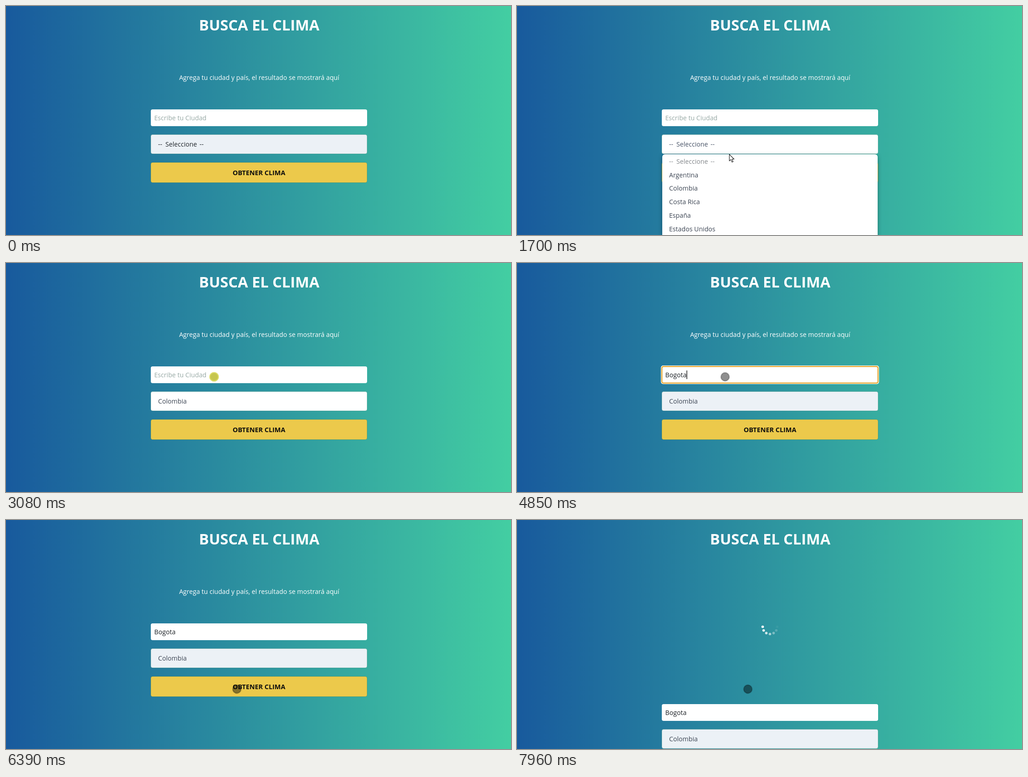
An HTML page for the animation above (8 s loop, 1109 by 505 pixels).

```html
<!DOCTYPE html>
<html lang="es">
<head>
<meta charset="utf-8">
<title>Busca el clima</title>
<style>
  html, body { margin: 0; width: 100%; height: 100%; overflow: hidden; }
  body { background: linear-gradient(to right, #185a9d, #43cea2); }
  svg { display: block; width: 1109px; height: 505px; }
  text { font: 14.15px "Open Sans", "Noto Sans", sans-serif; fill: #3d4654; }
  .title { font-size: 32.6px; font-weight: 700; fill: #fff; text-anchor: middle; }
  .hint { fill: #fff; text-anchor: middle; }
  .button { font-size: 14.4px; font-weight: 700; fill: #0c0c0c; text-anchor: middle; }
  .edge { stroke: #14705a; stroke-opacity: .35; }
  #panel { filter: drop-shadow(0 3px 5px rgba(0, 0, 0, .32)); }
</style>
</head>
<body>
<svg viewBox="0 0 1109 505">
  <text class="title" x="556" y="54">BUSCA EL CLIMA</text>
  <text class="hint" id="hint" x="556" y="163">Agrega tu ciudad y país, el resultado se mostrará aquí</text>
  <g id="spinner" fill="#fff"></g>

  <g id="form">
    <rect class="edge" x="318" y="345" width="475" height="44.5" rx="4" fill="#ecc94b"/>
    <text class="button" x="555.5" y="372.5">OBTENER CLIMA</text>

    <g id="ring">
      <rect x="316" y="226" width="479" height="41" rx="5" fill="#fff"/>
      <rect x="318.2" y="228.2" width="474.6" height="36.6" rx="3.5" fill="none" stroke="#e2970c" stroke-width="2"/>
    </g>
    <rect id="field" x="318" y="228" width="475" height="37" rx="4" fill="#fff"/>
    <text id="placeholder" x="325.5" y="252" style="fill:#98aaa6">Escribe tu Ciudad</text>
    <text id="city" x="325.5" y="252" style="fill:#1c2126"></text>
    <rect id="caret" y="237" width="1.3" height="19" fill="#000"/>

    <rect class="edge" id="select" x="318" y="283.5" width="475" height="42.5" rx="4"/>
    <text id="empty" y="310"><tspan x="334">--</tspan><tspan x="350">Seleccione</tspan><tspan x="425">--</tspan></text>
    <text id="country" x="334" y="310">Colombia</text>
  </g>

  <g id="panel">
    <rect x="319" y="327" width="473" height="300" rx="6" fill="#fff"/>
    <rect id="hover" x="319" y="386.6" width="473" height="29.6" fill="#ade1f7"/>
    <text y="348" style="fill:#85898d"><tspan x="334">--</tspan><tspan x="350">Seleccione</tspan><tspan x="425">--</tspan></text>
  </g>

  <circle id="dot"/>
  <path id="arrow" d="M0 0V14.5L3.4 11.5L5.8 17.2L8.3 16.1L5.9 10.6H10.4Z" stroke="#111" stroke-width="1.1" stroke-linejoin="round"/>
</svg>
<script>
const LOOP = 8000;
const $ = id => document.getElementById(id);
const svg = (tag, attrs, parent) => {
  const el = document.createElementNS("http://www.w3.org/2000/svg", tag);
  set(el, attrs);
  return parent.appendChild(el);
};
function set(el, attrs) {
  for (const key in attrs) el.setAttribute(key, attrs[key]);
}
const show = (id, on) => { $(id).style.display = on ? "" : "none"; };
const within = (t, from, to) => t >= from && t < to;
const smooth = p => p * p * (3 - 2 * p);

// Dropdown rows
const options = ["Argentina", "Colombia", "Costa Rica", "España", "Estados Unidos"]
  .map((name, i) => {
    const row = svg("text", { x: 334, y: 377.7 + i * 29.7 }, $("panel"));
    row.textContent = name;
    return row;
  });

// Ring of fading dots
const dots = Array.from({ length: 12 }, (_, i) => {
  const a = i * Math.PI / 6;
  return svg("circle", {
    cx: 555.5 + 16 * Math.sin(a), cy: 235.5 - 16 * Math.cos(a), r: 2.8
  }, $("spinner"));
});

// Pointer path: [time, x, y]
const path = [
  [260, 911, 466], [450, 720, 330], [600, 520, 255], [720, 385, 264],
  [780, 361, 285], [910, 475, 312],
  [1610, 475, 312], [1890, 440, 373],
  [2130, 440, 373], [2230, 413, 402],
  [2700, 413, 402], [3000, 457, 251],
  [5320, 457, 251], [5600, 502, 372],
  [5780, 502, 372], [5880, 507, 373]
];

// Pointer look from each time on
const looks = [
  [0, "none"], [260, "arrow"], [1090, "press"], [1140, "olive"], [1190, "grey"],
  [1610, "arrow"], [2460, "press"], [2560, "grey"],
  [2700, "arrow"], [3030, "press"], [3080, "olive"], [3410, "grey"],
  [5320, "arrow"], [6060, "press"], [6200, "olive"], [6300, "grey"]
];

const dotStyles = {
  press: { r: 11, fill: "#dcee38", "fill-opacity": .8, stroke: "none" },
  olive: { r: 9.4, fill: "#c6c64f", "fill-opacity": 1, stroke: "#dcdc66", "stroke-opacity": 1, "stroke-width": 2.2 },
  grey: { r: 9.2, fill: "#000", "fill-opacity": .44, stroke: "#000", "stroke-opacity": .22, "stroke-width": 2.4 }
};

// Length of the typed city from each time on
const typing = [[0, 0], [3920, 1], [4150, 2], [4470, 3], [4570, 4], [4670, 5], [4850, 6]];

const latest = (table, t) => table.filter(row => row[0] <= t).pop()[1];

function pointerAt(t) {
  const i = path.findIndex(p => p[0] > t);
  if (i === 0) return path[0].slice(1);
  if (i < 0) return path[path.length - 1].slice(1);
  const [t0, x0, y0] = path[i - 1], [t1, x1, y1] = path[i];
  const raw = (t - t0) / (t1 - t0);
  const p = t < 910 ? raw : smooth(raw);
  return [x0 + (x1 - x0) * p, y0 + (y1 - y0) * p];
}

function drawPointer(t) {
  const [x, y] = pointerAt(t);
  const look = latest(looks, t);
  const style = dotStyles[look];
  show("arrow", look === "arrow" || look === "press");
  show("dot", !!style);
  set($("arrow"), { transform: `translate(${x} ${y})`, fill: look === "press" ? "#e6f52e" : "#fff" });
  if (style) set($("dot"), { cx: x, cy: y, ...style });
}

function drawField(t) {
  const focus = within(t, 3180, 6300);
  const length = latest(typing, t);
  $("city").textContent = "Bogota".slice(0, length);
  show("placeholder", !length);
  show("ring", focus);
  show("field", !focus);
  const blinkOff = within(t, 3690, 3920) || within(t, 5350, 5860);
  show("caret", focus && !blinkOff);
  set($("caret"), { x: 325.5 + (length ? $("city").getComputedTextLength() : 0) });
}

function drawSelect(t) {
  const picked = t >= 2560;
  const active = within(t, 1240, 3180);
  const hover = t >= 2460;
  set($("select"), { fill: active ? "#fff" : "#ecf1f6" });
  $("empty").style.fill = active ? "#4a5568" : "#20262c";
  show("empty", !picked);
  show("country", picked);
  show("panel", within(t, 1240, 2560));
  show("hover", hover);
  options[1].style.fill = hover ? "#fff" : "";
}

function drawSpinner(t) {
  const loading = t >= 6580;
  show("hint", !loading);
  show("spinner", loading);
  set($("form"), { transform: `translate(0 ${loading ? 178 : 0})` });
  dots.forEach((dot, i) => {
    const age = (t - 7940 - (i - 9) * 100 + 2 * LOOP + 800) % 1200;
    set(dot, { opacity: age < 720 ? 1 - smooth(age / 720) : 0 });
  });
}

const start = performance.now();
function frame() {
  const t = (performance.now() - start) % LOOP;
  drawField(t);
  drawSelect(t);
  drawSpinner(t);
  drawPointer(t);
  requestAnimationFrame(frame);
}
frame();
</script>
</body>
</html>
```
